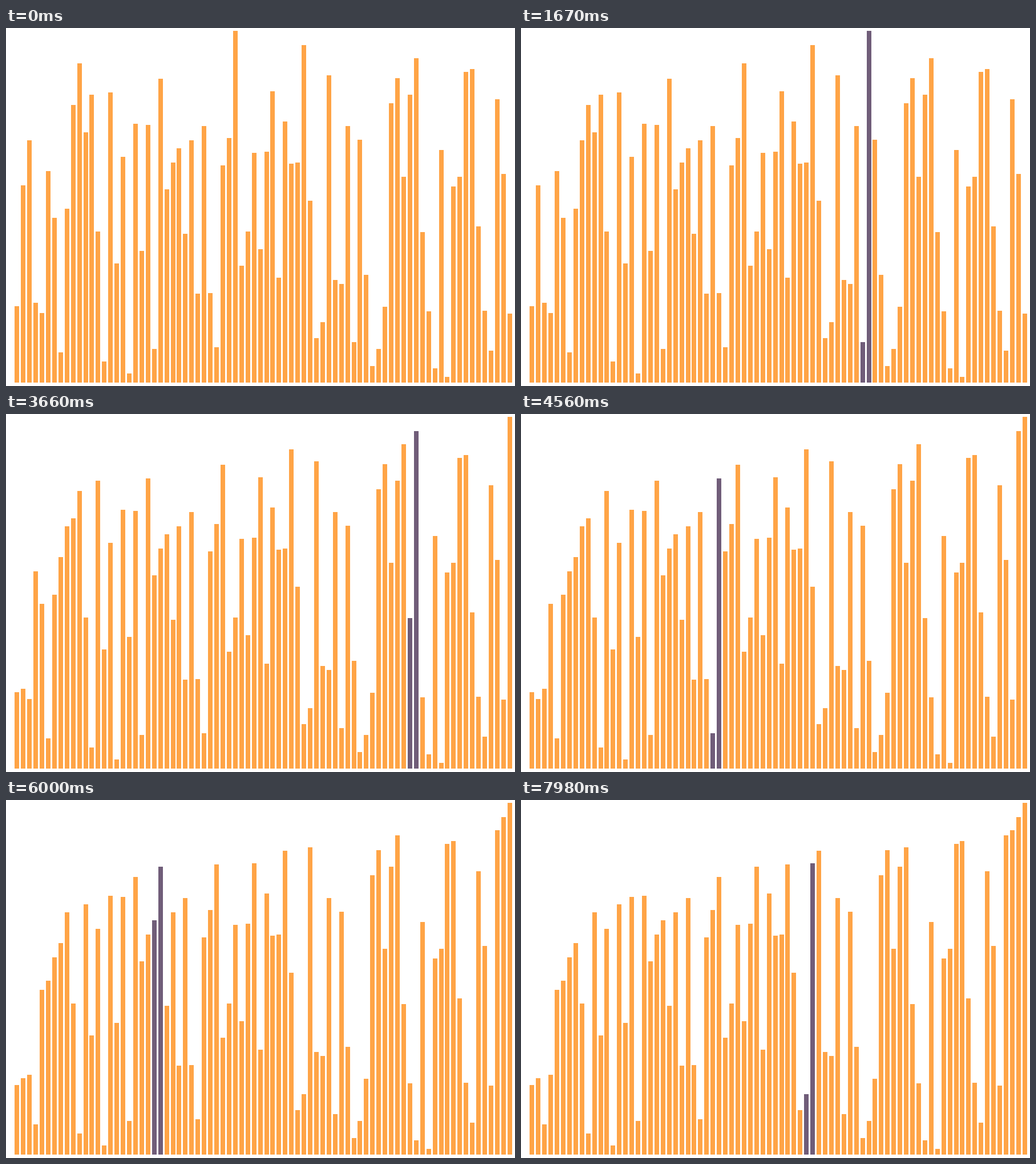
Write an HTML page with a canvas that moves like this. It is 892 px wide and 628 px high and loops after 8 s.

```html
<!DOCTYPE html>
<html lang="en">
<head>
<meta charset="utf-8">
<title>Bubble sort</title>
<style>
  html, body { margin: 0; height: 100%; overflow: hidden; background: #fff; }
  canvas { display: block; }
</style>
</head>
<body>
<canvas id="stage" width="892" height="628"></canvas>
<script>
const ctx = document.getElementById('stage').getContext('2d');
const LOOP = 8000, STEPS = 110;
const BASE = 622, LEFT = 15.3, PITCH = 10.93, WIDTH = 8;

// The unsorted input: top edge of each bar
const bars = [
  488, 276, 197, 482, 500, 251, 333, 569, 317, 135,
  62, 183, 117, 357, 585, 113, 413, 226, 606, 168,
  391, 170, 563, 89, 283, 236, 211, 361, 197, 466,
  172, 465, 560, 241, 193, 5, 417, 357, 219, 388,
  217, 111, 438, 164, 238, 236, 30, 303, 544, 516,
  83, 442, 449, 172, 551, 196, 433, 593, 563, 489,
  132, 88, 261, 117, 53, 358, 497, 597, 214, 612,
  278, 261, 77, 72, 348, 496, 566, 125, 256, 501
];

// A step lasts 70 ms, every seventh one 60 ms
const stepTime = n => 500 + 70 * n - 10 * Math.floor(n / 7);
const swapsAt = n => Math.round(2.752 * (n + 1) - 0.05);

// Bubble sort that pauses after every swap
function* bubble() {
  for (let end = bars.length - 1; end > 0; end--) {
    for (let j = 0; j < end; j++) {
      if (bars[j] < bars[j + 1]) {
        [bars[j], bars[j + 1]] = [bars[j + 1], bars[j]];
        yield j;
      }
    }
  }
}

const states = [{ time: 0, tops: [...bars], pair: NaN }];
const sorter = bubble();
for (let n = 0, done = 0, pair; n < STEPS; n++) {
  for (; done < swapsAt(n); done++) pair = sorter.next().value;
  states.push({ time: stepTime(n), tops: [...bars], pair });
}

function draw({ tops, pair }) {
  ctx.fillStyle = '#fff';
  ctx.fillRect(0, 0, 892, 628);
  tops.forEach((top, i) => {
    ctx.fillStyle = i === pair || i === pair + 1 ? '#705d79' : '#ffa446';
    ctx.fillRect(Math.round(LEFT + i * PITCH), top, WIDTH, BASE - top);
  });
}

const start = performance.now();
function tick() {
  const t = (performance.now() - start) % LOOP;
  draw(states.findLast(s => s.time <= t));
  requestAnimationFrame(tick);
}
tick();
</script>
</body>
</html>
```
